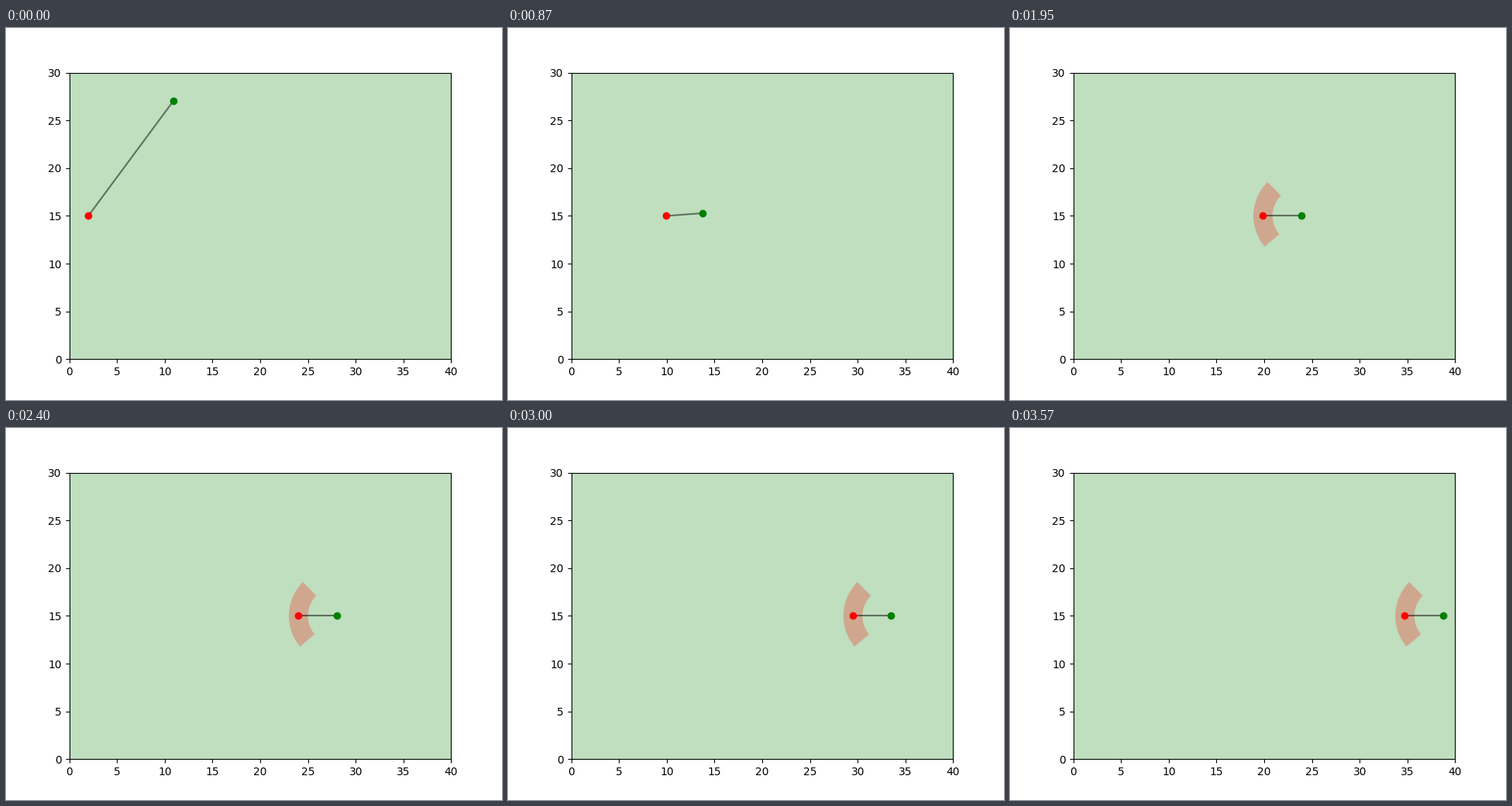
Recreate the animation shown at these times as a matplotlib script. Size 640 by 480 pixels, loop 3.6 s.

```python
import math

import matplotlib.pyplot as plt
from matplotlib.animation import FuncAnimation
from matplotlib.patches import Wedge

FRAMES = 120
INTERVAL = 30

WALK = 0.275            # walker's step along x
START = (2.0, 15.0)
GAP = 4.0               # distance the robot keeps ahead of the walker
ROBOT_START = (10.91, 27.04)
ROBOT_VEL = (0.098, -0.4055)
APPROACH = 29           # steps on the straight course


def walker(n):
    return START[0] + WALK * n, START[1]


def robot_path():
    """Straight course first, then close in on the spot ahead of the walker."""
    speed = math.hypot(*ROBOT_VEL)
    x, y = ROBOT_START
    path = [(x, y)]
    arrival = None
    for n in range(1, FRAMES):
        wx, wy = walker(n)
        dx, dy = wx + GAP - x, wy - y
        dist = math.hypot(dx, dy)
        if n <= APPROACH:
            x, y = x + ROBOT_VEL[0], y + ROBOT_VEL[1]
        elif dist > speed:
            x, y = x + dx / dist * speed, y + dy / dist * speed
        else:
            x, y = wx + GAP, wy
            arrival = arrival or n
        path.append((x, y))
    return path, arrival


path, arrival = robot_path()

fig, ax = plt.subplots(figsize=(6.4, 4.8), dpi=100)
ax.set_xlim(0, 40)
ax.set_ylim(0, 30)
ax.set_aspect("equal")
ax.set_facecolor("#bfdfbf")

view = Wedge(path[0], 5, 135, 220, width=2, facecolor="red", alpha=0.25,
             linewidth=0, visible=False)
ax.add_patch(view)
link, = ax.plot([], [], color="black", alpha=0.5)
walker_dot, = ax.plot([], [], "o", color="red")
robot_dot, = ax.plot([], [], "o", color="green")


def update(n):
    wx, wy = walker(n)
    rx, ry = path[n]
    link.set_data([wx, rx], [wy, ry])
    walker_dot.set_data([wx], [wy])
    robot_dot.set_data([rx], [ry])
    view.set_center((rx, ry))
    view.set_visible(n >= arrival)
    return view, link, walker_dot, robot_dot


anim = FuncAnimation(fig, update, frames=FRAMES, interval=INTERVAL,
                     repeat=True, repeat_delay=0)
plt.show()
```
